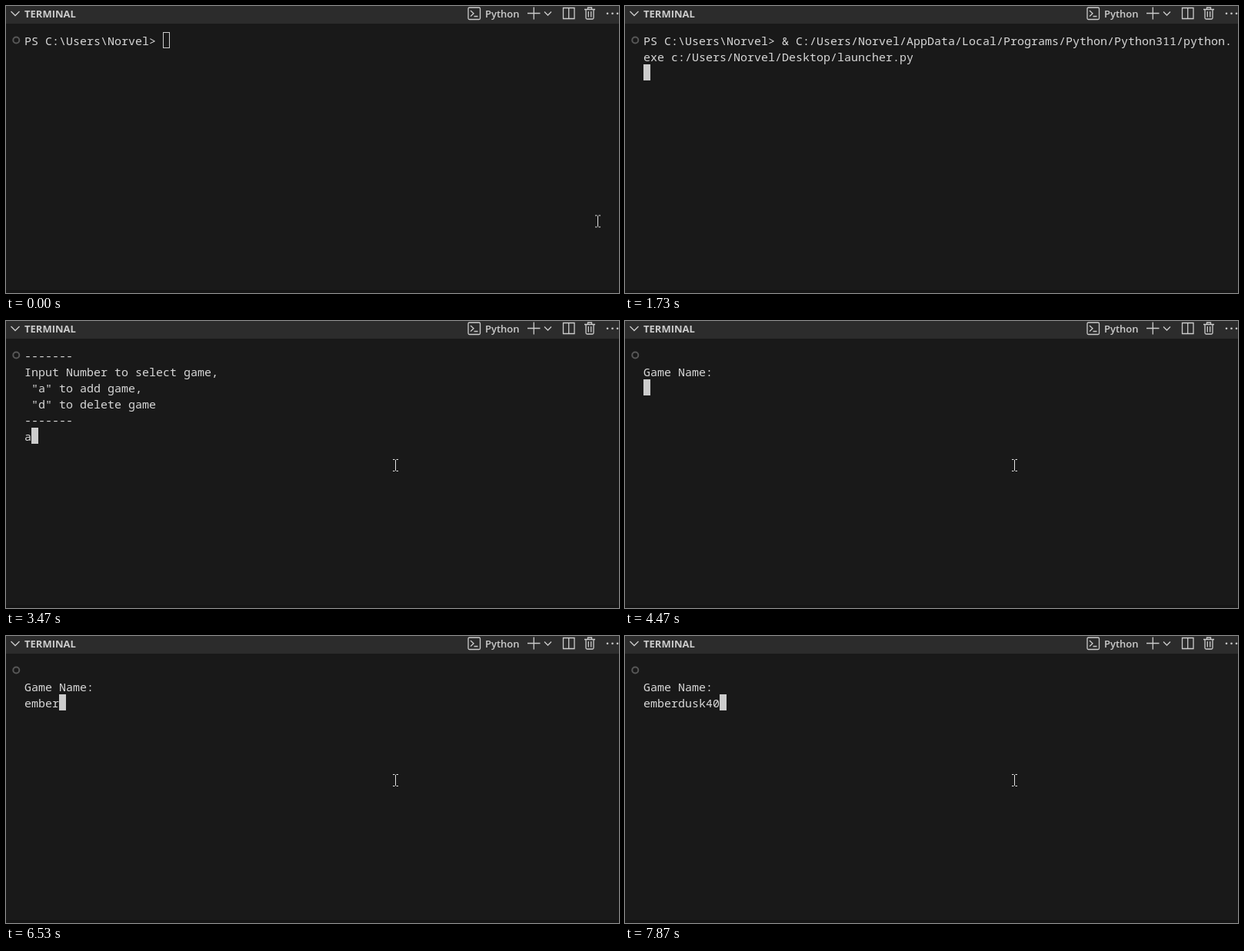
Animation, 797 px wide and 374 px high, one loop 8 s. Source, as an HTML page:

```html
<!DOCTYPE html>
<html lang="en">
<head>
<meta charset="utf-8">
<title>Terminal</title>
<style>
  html, body { margin: 0; width: 100%; height: 100%; overflow: hidden; background: #191919; }
  svg { display: block; width: 797px; height: 374px; }
  text { fill: #ccc; white-space: pre; }
  .ui { font: 700 13px "Open Sans", "Noto Sans", sans-serif; }
  .semi { font-weight: 600; }
  #screen text { font: 15px "Noto Sans Mono", monospace; fill: #d8d8d8; }
  .line { fill: none; stroke: #ccc; stroke-width: 1.3; }
</style>
</head>
<body>
<svg viewBox="0 0 797 374">
  <rect width="797" height="374" fill="#191919"/>
  <rect width="797" height="23" fill="#2c2c2c"/>
  <rect y="370" width="797" height="4" fill="#151515"/>
  <path class="line" d="M6.5 7L12 12.5L17.5 7"/>
  <text class="ui" x="24" y="15">TERMINAL</text>
  <g id="actions">
    <g class="line">
      <rect x="601" y="2" width="15.5" height="15.5" rx="1.5"/>
      <path d="M604 6L608 9.7L604 13.5M608.5 13.5H613.5"/>
      <path d="M678 9.5H694.5M686.3 1.5V17.5"/>
      <path d="M700 7.5L704.5 12L709 7.5"/>
      <path d="M724.5 2.5H739V16.5H724.5ZM731.7 2.5V16.5"/>
      <path d="M752 4.5H766M756.5 4.5V2H761.5V4.5M754 4.5V15.5Q754 17 755.5 17H762.5Q764 17 764 15.5V4.5M757.3 7V14.5M760.7 7V14.5"/>
    </g>
    <text class="ui semi" x="623" y="15">Python</text>
    <g fill="#ccc">
      <circle cx="782" cy="9.7" r="1.3"/><circle cx="788.5" cy="9.7" r="1.3"/><circle cx="795" cy="9.7" r="1.3"/>
    </g>
  </g>
  <circle cx="13.3" cy="44.5" r="4" fill="none" stroke="#575757" stroke-width="2"/>
  <g id="screen"></g>
  <rect id="cursor" stroke="#ccc"/>
  <path id="mouse" d="M-3.5 -7.5H-1M1 -7.5H3.5M0 -7V7M-3.5 7.5H-1M1 7.5H3.5" fill="none" stroke="#e4e4e4"/>
</svg>
<script>
const LOOP = 8000, CELL = 9, ROW = 21, LEFT = 24, TOP = 34, COLUMNS = 85;
const byId = id => document.getElementById(id);

const prompt = "PS C:\\Users\\Norvel> ";
const command = prompt + "& C:/Users/Norvel/AppData/Local/Programs/Python/Python311/python.exe c:/Users/Norvel/Desktop/launcher.py";
const menu = '-------\nInput Number to select game,\n "a" to add game,\n "d" to delete game\n-------\n';
const nameForm = "\nGame Name:\n";
const gameName = "emberdusk40";
const keyTimes = [6000, 6070, 6200, 6400, 6530, 6600, 6730, 6800, 6870, 7730, 7870];

// Each list holds [start time, value] pairs.
const texts = [
  [0, prompt], [1670, command], [1730, command + "\n"], [1870, menu],
  [3470, menu + "a"], [4400, menu + "a\n"], [4470, nameForm],
  ...keyTimes.map((time, i) => [time, nameForm + gameName.slice(0, i + 1)])
];
const mousePath = [
  [0, [769.5, 280.5]], [70, null], [2470, [593.5, 169]], [2530, [530.5, 190]], [2600, [506.5, 188]]
];

const at = (list, time) => list.findLast(([start]) => start <= time)[1];

const wrap = line => line.match(new RegExp(`.{1,${COLUMNS}}`, "g")) || [""];

let shownText;
function showText(text) {
  if (text === shownText) return;
  shownText = text;
  const rows = text.split("\n").flatMap(wrap);
  byId("screen").replaceChildren(...rows.map((row, i) => {
    const node = document.createElementNS("http://www.w3.org/2000/svg", "text");
    node.setAttribute("x", LEFT);
    node.setAttribute("y", TOP + 17 + i * ROW);
    node.textContent = row;
    return node;
  }));
  const last = rows.length - 1;
  const cursor = byId("cursor");
  cursor.setAttribute("x", LEFT + rows[last].length * CELL + 0.5);
  cursor.setAttribute("y", TOP + last * ROW + 0.5);
  cursor.setAttribute("width", CELL - 1);
  cursor.setAttribute("height", ROW - 1);
}

function draw(time) {
  const focused = time >= 1600;
  const mouse = at(mousePath, time);
  showText(at(texts, time));
  byId("cursor").setAttribute("fill", focused ? "#ccc" : "none");
  byId("actions").style.display = time < 70 || focused ? "" : "none";
  byId("mouse").style.display = mouse ? "" : "none";
  if (mouse) byId("mouse").setAttribute("transform", `translate(${mouse})`);
}

function tick() {
  draw(performance.now() % LOOP);
  requestAnimationFrame(tick);
}
tick();
</script>
</body>
</html>
```
